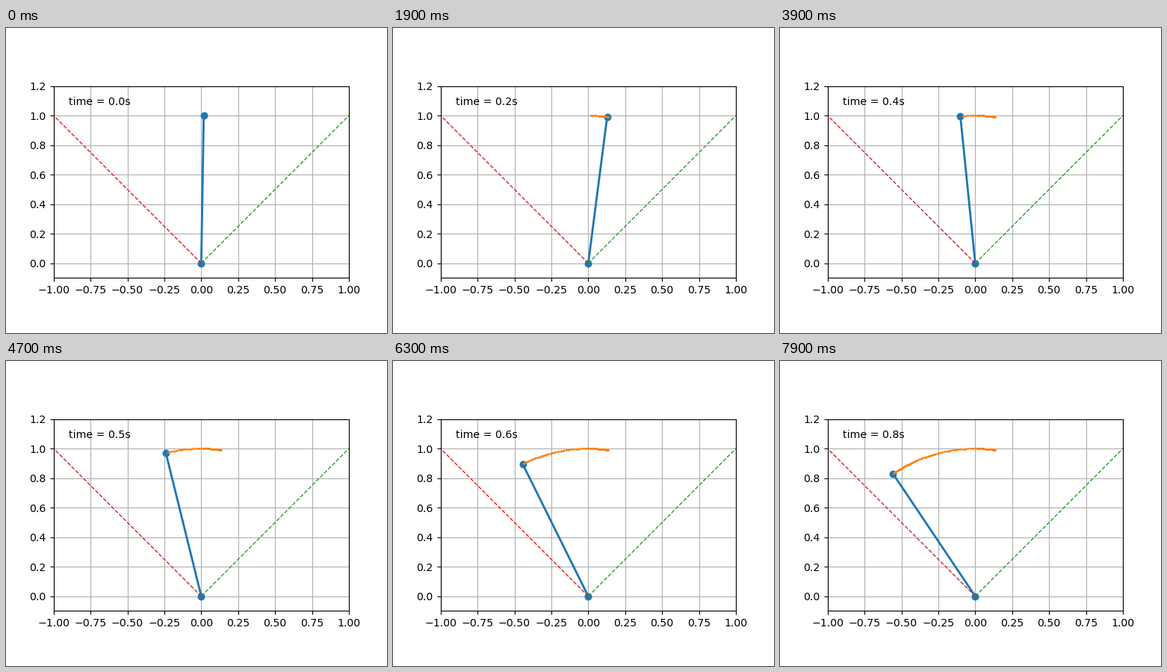
A matplotlib script that plays this animation: 510 px wide and 408 px high, repeating every 8 s.

```python
import numpy as np
import matplotlib.pyplot as plt
from matplotlib.animation import FuncAnimation

FRAMES = 80
DT = 0.01
LENGTH = 1.0
POSES = np.radians([0.95, 7.4, 4.85, -6.25, -19.3, -28, -33.9])


def ease_through(poses, n):
    """Sample n values of a smooth curve through evenly spaced poses."""
    slope = np.gradient(poses, edge_order=2)
    x = np.linspace(0, len(poses) - 1, n)
    k = np.minimum(x.astype(int), len(poses) - 2)
    u = x - k
    blend = u * u * (3 - 2 * u)
    return (poses[k] + blend * (poses[k + 1] - poses[k])
            + u * (1 - u) * ((1 - u) * slope[k] - u * slope[k + 1]))


tilt = ease_through(POSES, FRAMES)
tip_x, tip_y = LENGTH * np.sin(tilt), LENGTH * np.cos(tilt)

fig = plt.figure(figsize=(5, 4), dpi=102)
ax = fig.add_subplot(autoscale_on=False, xlim=(-1, 1), ylim=(-0.1, 1.2))
ax.set_aspect("equal")
ax.grid()

rod, = ax.plot([], [], "o-", lw=2)
trace, = ax.plot([], [], ".-", lw=1, ms=2)
for side in (1, -1):
    ax.plot([0, side], [0, 1], "--", lw=1)
clock = ax.text(0.05, 0.9, "", transform=ax.transAxes)


def animate(i):
    rod.set_data([0, tip_x[i]], [0, tip_y[i]])
    trace.set_data(tip_x[:i], tip_y[:i])
    clock.set_text(f"time = {i * DT:.1f}s")
    return rod, trace, clock


anim = FuncAnimation(fig, animate, frames=FRAMES, interval=100,
                     repeat=True, repeat_delay=0)
plt.show()
```
